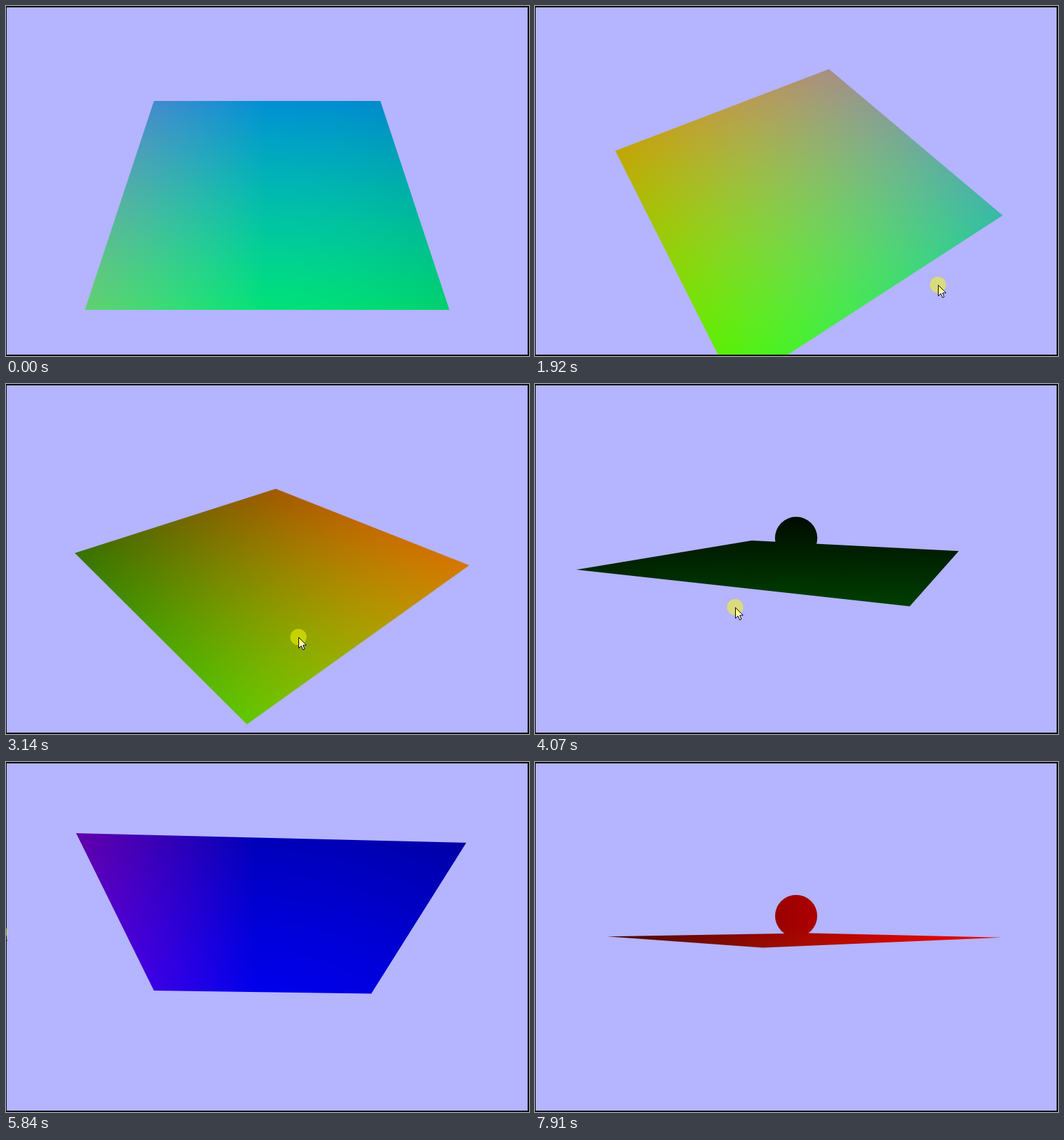
Recreate the animation shown at these times as an HTML page with a canvas. Size 771 by 516 pixels, loop 7.99 s.

```html
<!DOCTYPE html>
<html lang="en">
<head>
<meta charset="utf-8">
<title>Orbit around a plane</title>
<style>
  html, body { margin: 0; width: 100%; height: 100%; overflow: hidden; background: #000; }
  canvas { display: block; }
</style>
</head>
<body>
<canvas id="stage" width="771" height="516"></canvas>
<script>
const W = 771, H = 516;
const LOOP = 7990, COUNT = 104, STEP = LOOP / COUNT;
const CX = 385, CY = 258;
const FOCAL = 622.8, DIST = 3.025, BALL = 0.1505; // plane spans -1..1

const ENTER = 0.07, PRESS = 0.6;            // seconds
const GRAB = { x: 710, y: 403 };            // where the drag begins
const TURN = 0.497 * Math.PI / 180;         // radians per dragged pixel
const TILT = Math.PI / 4;                   // elevation before the drag

// Pointer path: seconds, x, y. The drag goes on outside the stage.
const PATH = [
  [0.07, 734, 512], [0.46, 711, 404], [0.69, 709.5, 404], [1.53, 646, 411],
  [1.921, 594.3, 411], [2.38, 533, 413], [3.15, 431.3, 372.8], [4.07, 295.5, 329],
  [5.071, 138.5, 256], [5.4, 74, 232], [5.839, -10.4, 251.1],
  [6.991, -152, 318.2], [7.55, -236, 331], [7.913, -296.4, 315.8]
];

const stage = document.getElementById('stage').getContext('2d');
const shade = document.createElement('canvas');
shade.width = W;
shade.height = H;
const shadeCtx = shade.getContext('2d');
const pixels = shadeCtx.createImageData(W, H);
const arrow = new Path2D('M.5 .5V16.5L4.3 13L6.8 18.8L9.2 17.8L6.8 12H11.8Z');

const clamp = (v, lo, hi) => Math.max(lo, Math.min(hi, v));
const dot = (a, b) => a[0] * b[0] + a[1] * b[1] + a[2] * b[2];

// Smooth interpolation that never overshoots its keys
function sample(keys, t, col) {
  const last = keys.length - 1;
  if (t <= keys[0][0]) return keys[0][col];
  if (t >= keys[last][0]) return keys[last][col];
  let i = 0;
  while (keys[i + 1][0] <= t) i++;
  const slope = k => (keys[k + 1][col] - keys[k][col]) / (keys[k + 1][0] - keys[k][0]);
  const tangent = k => {
    if (k === 0) return slope(0);
    if (k === last) return slope(last - 1);
    const a = slope(k - 1), b = slope(k);
    return a * b <= 0 ? 0 : 2 * a * b / (a + b);
  };
  const span = keys[i + 1][0] - keys[i][0];
  const p = (t - keys[i][0]) / span, q = 1 - p;
  return q * q * (1 + 2 * p) * keys[i][col] + p * p * (3 - 2 * p) * keys[i + 1][col]
    + span * p * q * (q * tangent(i) - p * tangent(i + 1));
}

const pointerAt = t => ({ x: sample(PATH, t, 1), y: sample(PATH, t, 2) });

// Dragging sideways turns the camera, dragging up or down tilts it
function cameraAt(t) {
  const hand = t < PRESS ? GRAB : pointerAt(t);
  const az = (GRAB.x - hand.x) * TURN;
  const el = TILT + (hand.y - GRAB.y) * TURN;
  const sa = Math.sin(az), ca = Math.cos(az), se = Math.sin(el), ce = Math.cos(el);
  return {
    right: [ca, 0, -sa],
    up: [-se * sa, ce, -se * ca],
    back: [ce * sa, se, ce * ca]
  };
}

function project(cam, p) {
  const depth = DIST - dot(cam.back, p);
  const k = FOCAL / depth;
  return { x: CX + k * dot(cam.right, p), y: CY - k * dot(cam.up, p), depth };
}

// Colour is the unit vector from the surface to the camera
function paintShade(cam, x0, y0, x1, y1) {
  const { right, up, back } = cam, data = pixels.data;
  for (let y = y0; y < y1; y++) {
    const v = CY - y - 0.5;
    for (let x = x0; x < x1; x++) {
      const u = x + 0.5 - CX;
      const k = 255 / Math.sqrt(u * u + v * v + FOCAL * FOCAL);
      const o = (y * W + x) * 4;
      for (let c = 0; c < 3; c++) {
        data[o + c] = k * (back[c] * FOCAL - right[c] * u - up[c] * v);
      }
      data[o + 3] = 255;
    }
  }
  shadeCtx.putImageData(pixels, 0, 0, x0, y0, x1 - x0, y1 - y0);
}

function disc(x, y, r) {
  stage.beginPath();
  stage.arc(x, y, r, 0, 2 * Math.PI);
  stage.fill();
}

function drawScene(t) {
  const cam = cameraAt(t);
  const corners = [[-1, 0, -1], [1, 0, -1], [1, 0, 1], [-1, 0, 1]].map(p => project(cam, p));
  const ball = project(cam, [0, BALL, 0]);
  const radius = FOCAL * BALL / Math.sqrt(ball.depth ** 2 - BALL ** 2);

  const xs = corners.map(p => p.x).concat(ball.x - radius, ball.x + radius);
  const ys = corners.map(p => p.y).concat(ball.y - radius, ball.y + radius);
  const low = (list, max) => clamp(Math.floor(Math.min(...list)) - 2, 0, max);
  const high = (list, max) => clamp(Math.ceil(Math.max(...list)) + 2, 0, max);
  paintShade(cam, low(xs, W), low(ys, H), high(xs, W), high(ys, H));

  stage.fillStyle = stage.createPattern(shade, 'no-repeat');
  stage.beginPath();
  corners.forEach(p => stage.lineTo(p.x, p.y));
  stage.fill();
  disc(ball.x, ball.y, radius);
}

function drawPointer(t) {
  if (t < ENTER) return;
  const { x, y } = pointerAt(t);
  stage.save();
  stage.translate(Math.round(x), Math.round(y));
  stage.fillStyle = '#fff';
  stage.fill(arrow);
  if (t >= PRESS) {
    stage.fillStyle = 'rgba(255, 255, 0, 0.5)';
    disc(0, 0, 12);
  }
  stage.strokeStyle = '#000';
  stage.stroke(arrow);
  stage.restore();
}

function draw(t) {
  stage.fillStyle = '#000';
  stage.fillRect(0, 0, W, H);
  stage.save();
  stage.beginPath();
  stage.rect(1, 2, 768, 512);
  stage.clip();
  stage.fillStyle = '#b4b4ff';
  stage.fillRect(1, 2, 768, 512);
  drawScene(t);
  stage.restore();
  drawPointer(t);
}

// Motion advances in even steps; each picture appears up to 10 ms early
let shown = -1;
const begin = performance.now();
function tick() {
  const i = Math.floor((performance.now() - begin + 10) / STEP) % COUNT;
  if (i !== shown) {
    shown = i;
    draw(i * STEP / 1000);
  }
  requestAnimationFrame(tick);
}
tick();
</script>
</body>
</html>
```
